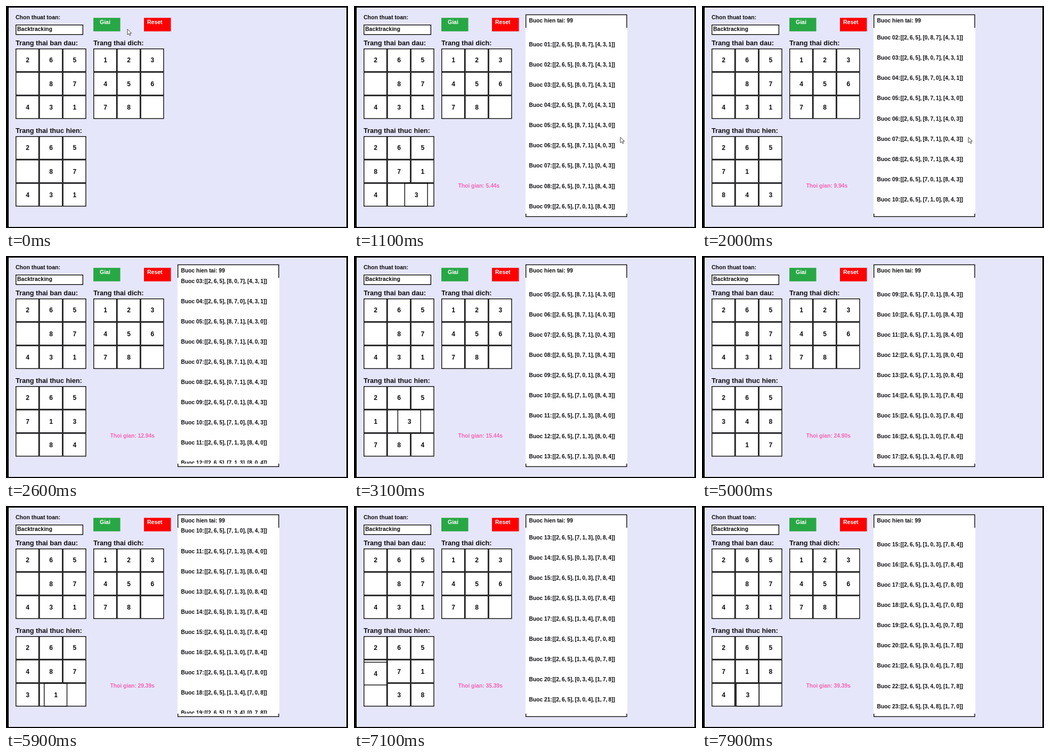
Animation, 642 px wide and 418 px high, one loop 8 s. Source, as an HTML page:

```html
<!DOCTYPE html>
<html lang="vi">
<head>
<meta charset="utf-8">
<title>8-puzzle solver</title>
<style>
  html, body { margin: 0; width: 100%; height: 100%; overflow: hidden; background: #000; }
  svg { display: block; }
  text { font: bold 10.5px "Liberation Sans", Arial, sans-serif; fill: #0c0c10; white-space: pre; }
  .head { font-size: 12.7px; }
  .num { font-size: 12px; text-anchor: middle; }
  .small { font-size: 10.3px; }
  .list { word-spacing: -0.9px; }
  .light { fill: #fff; }
  .box { fill: #fff; stroke: #0a0a0a; stroke-width: 1.4; }
  #time { fill: #f264b4; }
</style>
</head>
<body>
<svg width="642" height="418" viewBox="0 0 642 418">
  <defs><clipPath id="view"><rect x="322" y="41" width="191" height="350"/></clipPath></defs>
  <rect width="642" height="418"/>
  <rect x="5" y="3" width="634" height="413" fill="#e6e6fa"/>

  <text x="18" y="24.6">Chon thuat toan:</text>
  <rect class="box" x="18.7" y="35.7" width="125.6" height="18"/>
  <text x="21" y="47">Backtracking</text>
  <rect x="164" y="22.3" width="50.5" height="25.4" fill="#28a745"/>
  <text class="light" x="176" y="34">Giai</text>
  <rect x="259" y="22.3" width="50.5" height="25.4" fill="#f00"/>
  <text class="light" x="265" y="34">Reset</text>

  <text class="head" x="18" y="74">Trang thai ban dau:</text>
  <text class="head" x="164" y="74">Trang thai dich:</text>
  <text class="head" x="18" y="239">Trang thai thuc hien:</text>
  <g id="boards"></g>

  <g id="results">
    <text id="time" class="small" x="195.5" y="342"></text>
    <rect class="box" x="322.7" y="16.5" width="189.3" height="380"/>
    <rect x="322" y="41" width="191" height="350" fill="#fff"/>
    <text class="small" x="328.5" y="30.7">Buoc hien tai: 99</text>
    <g clip-path="url(#view)"><g id="rows"></g></g>
  </g>

  <path id="cursor" d="M0 0V10.5L2.5 8.3L4.2 12L6 11.2L4.4 7.6H7.6Z" fill="#fff" stroke="#333" stroke-width="0.9"/>
</svg>
<script>
const LOOP = 8000, TICK = 100;
const CELL = 44.2, ROW = 38.1, NOTCH = 12.7;
const START = "265087431";
const MOVES = "RRDLLU".repeat(4) + "RRDL" + "URDLLURRDL";
const SHIFT = { R: 1, L: -1, D: 3, U: -3 };

// solver clock in seconds: when the first slide starts, the step length, the slide length
const FIRST_STEP = 3, FIRST_AT = 2.127, STEP = 1.0068, SLIDE = 0.4;

// [x, y] points, straight between them
const SCROLL_AT = [[1400, 0], [2000, 4], [3100, 12], [5000, 24], [5900, 29], [7100, 37], [7900, 42]];
const CURSOR_X = [[0, 228], [900, 500]];
const CURSOR_Y = [[0, 43.5], [900, 247]];
const CURSOR_GONE = 2600;

const $ = id => document.getElementById(id);
const clamp = v => Math.max(0, Math.min(1, v));

function along(points, x) {
  if (x <= points[0][0]) return points[0][1];
  for (let i = 1; i < points.length; i++) {
    const [x0, y0] = points[i - 1], [x1, y1] = points[i];
    if (x <= x1) return y0 + (y1 - y0) * (x - x0) / (x1 - x0);
  }
  return points[points.length - 1][1];
}

function add(parent, tag, attrs, text = "") {
  const el = document.createElementNS("http://www.w3.org/2000/svg", tag);
  for (const key in attrs) el.setAttribute(key, attrs[key]);
  el.textContent = text;
  return parent.appendChild(el);
}

const place = (el, x, y) => el.setAttribute("transform", `translate(${x} ${y})`);
const label = digit => digit === "0" ? "" : digit;

function addTile(parent, digit) {
  const tile = add(parent, "g", {});
  add(tile, "rect", { class: "box", x: 0.7, y: 0.7, width: CELL - 1.4, height: CELL - 1.4 });
  const text = add(tile, "text", { class: "num", x: CELL / 2 + 0.4, y: 26.4 }, label(digit));
  return { tile, text };
}

function addBoard(x, y, digits) {
  const group = add($("boards"), "g", {});
  place(group, x, y);
  const cells = [...digits].map((digit, i) => {
    const cell = addTile(group, digit);
    place(cell.tile, i % 3 * CELL, Math.floor(i / 3) * CELL);
    return cell;
  });
  return { group, cells };
}

// states[n] is the board at step n
const states = [START, START, START];
for (const move of MOVES) {
  const next = [...states[states.length - 1]];
  const blank = next.indexOf("0"), from = blank + SHIFT[move];
  next[blank] = next[from];
  next[from] = "0";
  states.push(next.join(""));
}

addBoard(18, 80, START);
addBoard(164, 80, "123456780");
const live = addBoard(18, 245, START);
const slider = addTile(live.group, "");

states.forEach((state, n) => {
  if (!n) return;
  const y = n * ROW + 4.2;
  const lists = state.match(/.../g).map(row => `[${[...row].join(", ")}]`).join(", ");
  add($("rows"), "text", { class: "small", x: 328.5, y }, `Buoc ${String(n).padStart(2, "0")}:`);
  add($("rows"), "text", { class: "small list", x: 372.5, y }, `[${lists}]`);
});

function drawLive(seconds) {
  const n = Math.max(FIRST_STEP - 1, FIRST_STEP + Math.floor((seconds - FIRST_AT) / STEP));
  const p = clamp((seconds - FIRST_AT - (n - FIRST_STEP) * STEP) / SLIDE);
  const state = states[n], old = states[n - 1];
  const to = old.indexOf("0"), from = state.indexOf("0");
  const moving = p < 1 && to !== from;
  live.cells.forEach((cell, i) => {
    cell.text.textContent = moving && i === to ? "" : label(state[i]);
  });
  slider.tile.style.display = moving ? "" : "none";
  if (!moving) return;
  slider.text.textContent = state[to];
  const mix = (a, b) => (a + (b - a) * p) * CELL;
  place(slider.tile, mix(from % 3, to % 3), mix(Math.floor(from / 3), Math.floor(to / 3)));
}

function draw(t) {
  const seconds = Math.max(0, t / 200 - 0.06 - 0.05 * clamp((t - 3100) / 2400));
  $("results").style.display = t < TICK ? "none" : "";
  $("time").textContent = `Thoi gian: ${seconds.toFixed(2)}s`;
  place($("rows"), 0, 33.6 - NOTCH * Math.round(along(SCROLL_AT, t)));
  $("cursor").style.display = t < CURSOR_GONE ? "" : "none";
  place($("cursor"), along(CURSOR_X, t), along(CURSOR_Y, t));
  drawLive(seconds);
}

const begin = performance.now();
function frame() {
  const t = (performance.now() - begin) % LOOP;
  draw(Math.floor(t / TICK) * TICK);
  requestAnimationFrame(frame);
}
frame();
</script>
</body>
</html>
```
